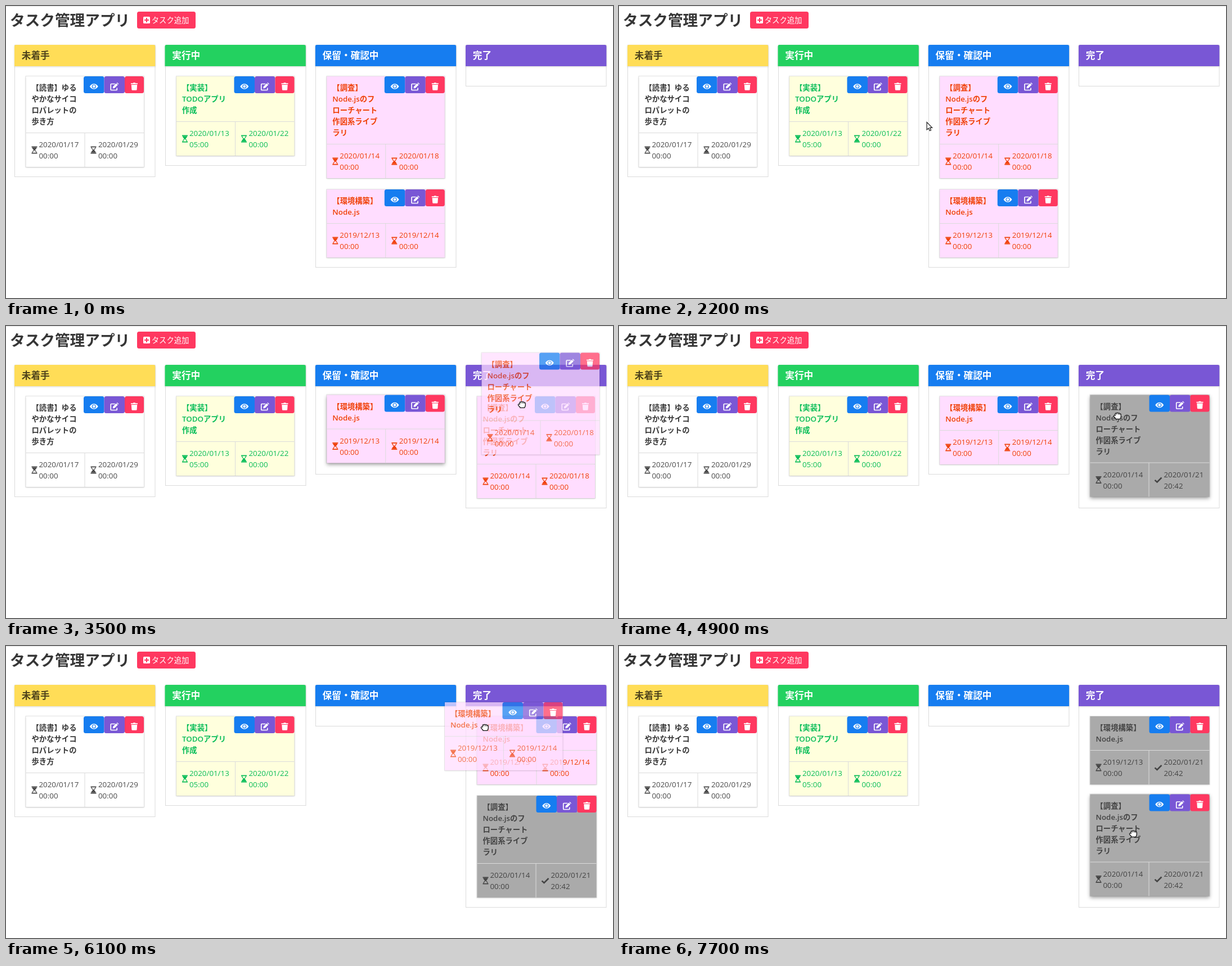
Write an HTML page that moves like this. It is 1079x519 px and loops after 8000 ms.

```html
<!DOCTYPE html>
<html lang="ja">
<head>
<meta charset="utf-8">
<title>タスク管理アプリ</title>
<style>
html, body { margin: 0; width: 100%; height: 100%; overflow: hidden; background: #fff; }
svg { display: block; width: 100%; height: 100%; }
text { font: 13.333px "Open Sans", "Noto Sans", "Noto Sans CJK JP", "Noto Sans CJK", sans-serif; white-space: pre; }
.title { font-weight: 600; }
.head { font-size: 16.667px; font-weight: 600; }
.app { font-size: 26.667px; font-weight: 600; }
.add { font-weight: 500; }
.shadow { filter: drop-shadow(0 1.5px 1.5px rgba(10,10,10,.16)); }
.lifted { filter: drop-shadow(0 3px 3px rgba(10,10,10,.38)); }
</style>
</head>
<body>
<svg id="stage" viewBox="0 0 1079 519"></svg>
<script>
const LOOP = 8000, STEP = 100, TOP = 125;
const stage = document.getElementById('stage');

const columns = [
  { x: 15, label: '未着手', fill: '#ffdd57', ink: 'rgba(0,0,0,.7)' },
  { x: 282.5, label: '実行中', fill: '#23d160', ink: '#fff' },
  { x: 549.8, label: '保留・確認中', fill: '#167df0', ink: '#fff' },
  { x: 817, label: '完了', fill: '#7957d5', ink: '#fff' }
];

const pink = { fill: '#ffddff', ink: '#f04006', titleInk: '#f04006' };
const gray = { fill: '#aaa', ink: '#444', titleInk: '#444', end: ['2020/01/21', '20:42'], done: true };
const reading = {
  lines: ['【読書】ゆる', 'やかなサイコ', 'ロパレットの', '歩き方'],
  start: ['2020/01/17', '00:00'], end: ['2020/01/29', '00:00'],
  fill: '#fff', ink: '#4a4a4a', titleInk: '#363636'
};
const coding = {
  lines: ['【実装】', 'TODOアプリ', '作成'],
  start: ['2020/01/13', '05:00'], end: ['2020/01/22', '00:00'],
  fill: '#ffffdd', ink: '#08bd58', titleInk: '#08bd58'
};
const survey = {
  lines: ['【調査】', 'Node.jsのフ', 'ローチャート', '作図系ライブ', 'ラリ'],
  start: ['2020/01/14', '00:00'], end: ['2020/01/18', '00:00'], ...pink
};
const setup = {
  lines: ['【環境構築】', 'Node.js'],
  start: ['2019/12/13', '00:00'], end: ['2019/12/14', '00:00'], ...pink
};
const surveyDone = { ...survey, ...gray }, setupDone = { ...setup, ...gray };

// Tracks hold [time, x, y]
const pointer = [
  [300, 128, 8], [500, 146, 110], [700, 158, 184], [800, 158, 184], [1300, 286.5, 188.5],
  [1600, 350, 192], [1800, 350, 192], [2400, 645, 213], [2800, 645, 213], [2900, 822, 189],
  [3500, 917, 140], [4800, 917, 140], [4900, 886, 160], [5200, 806, 120], [5700, 642, 167],
  [5800, 720, 160], [5900, 790, 153], [6000, 790, 153], [6100, 851, 145], [6300, 886, 135],
  [6800, 886, 135], [7700, 914, 334]
];
const drags = [
  { card: survey, from: 2900, to: 3900, track: [[2900, 746, 99], [3500, 845.5, 47.5]] },
  { card: setup, from: 5800, to: 6600,
    track: [[5800, 650, 114], [5900, 719, 109], [6000, 719, 109], [6100, 780, 100], [6300, 814, 90]] }
];

function at(track, t) {
  const i = track.findIndex(key => key[0] > t);
  if (i < 0) return track[track.length - 1].slice(1);
  if (i === 0) return track[0].slice(1);
  const a = track[i - 1], b = track[i], k = (t - a[0]) / (b[0] - a[0]);
  return [a[1] + (b[1] - a[1]) * k, a[2] + (b[2] - a[2]) * k];
}

function board(t) {
  const open = t < 3200 ? [survey, setup] : t < 6100 ? [setup] : [];
  const closed = t < 3200 ? [] : t < 4000 ? [survey] : t < 6100 ? [surveyDone]
    : [t < 6600 ? setup : setupDone, surveyDone];
  return [[reading], [coding], open, closed];
}

const rect = (x, y, w, h, fill, extra = '') =>
  `<rect x="${x}" y="${y}" width="${w}" height="${h}" fill="${fill}" ${extra}/>`;
const line = (x1, y1, x2, y2) => `<path d="M${x1} ${y1}L${x2} ${y2}" stroke="#dbdbdb"/>`;
const text = (x, y, str, fill, cls = '') =>
  `<text x="${x}" y="${y}" fill="${fill}" class="${cls}">${str}</text>`;
const place = (x, y, body, extra = '') => `<g transform="translate(${x} ${y}) ${extra}">${body}</g>`;

const icons = {
  eye: `<path d="M-7.5 0C-4-6.4 4-6.4 7.5 0C4 6.4-4 6.4-7.5 0z" fill="#fff"/>
    <circle r="3.6" fill="#167df0"/><circle r="2.4" fill="#fff"/>`,
  edit: `<path d="M1-4.5H-5.5Q-6.5-4.5-6.5-3.5V5.5Q-6.5 6.5-5.5 6.5H3.5Q4.5 6.5 4.5 5.5V2.5" fill="none" stroke="#fff" stroke-width="1.7"/>
    <path d="M-3 3.5L-2.6.3L3.2-5.5L6-2.7L.2 3.1zM4-6.3L5-7.1L7.6-4.5L6.8-3.5z" fill="#fff"/>`,
  trash: `<path d="M-6-5.7H-2.3L-1.6-6.7H1.6L2.3-5.7H6V-4H-6zM-5.2-3.1H5.2L4.6 5.5Q4.5 6.7 3.3 6.7H-3.3Q-4.5 6.7-4.6 5.5z" fill="#fff"/>`,
  plus: `<rect x="-6" y="-6" width="12" height="12" rx="1.5" fill="#fff"/>
    <path d="M-4 0H4M0-4V4" stroke="#ff3860" stroke-width="2"/>`,
  arrow: `<path d="M.5.5V14L3.6 11.2L5.7 15.8L8 14.8L5.9 10.3H10z" fill="#fff" stroke="#222" stroke-width="1.2"/>`,
  hand: `<path d="M-4-1V-3.5Q-3.6-5.5-1.6-4.8Q0-6.4 1.5-4.8Q3.2-5.7 4-4Q6.3-4.4 6.3-2V1Q6.3 3 4.6 5.3H-3Q-3.4 3.7-5.2 2.3Q-7.3 0-6.2-1Q-5.2-1.8-4-1z" fill="#fff" stroke="#111" stroke-width="1.3"/>
    <path d="M-1.4-3.8V-2.3M1.5-3.8V-2.3M4-3.2V-2" stroke="#111"/>`
};
const hourglass = ink => `<path d="M-5-6.6H5V-4.8H-5zM-5 4.8H5V6.6H-5zM-4.2-5C-4.2-2-1.4-1.2-1.4 0H1.4C1.4-1.2 4.2-2 4.2-5z" fill="${ink}"/>
  <path d="M-3.6 5C-3.6 2-.9 1.2-.9 0H.9C.9 1.2 3.6 2 3.6 5" fill="none" stroke="${ink}" stroke-width="1.3"/>`;
const check = ink => `<path d="M-6 .3L-2 4L6-4" fill="none" stroke="${ink}" stroke-width="2.5"/>`;

const cardHeight = card => card.lines.length * 20 + 81;

function drawCard(card, w, lifted) {
  const h = cardHeight(card), foot = h - 60.5, mid = foot + 30.5;
  const split = card.done ? 104.5 : Math.round(w / 2) - .5;
  const dates = (x, rows) => rows.map((s, i) => text(x, foot + 25.5 + i * 20, s, card.ink)).join('');
  const button = (x, bw, fill, icon) =>
    rect(x, 0, bw, 30, fill, 'rx="3.5"') + place(x + bw / 2, 18, icons[icon]);
  return rect(0, 0, w, h, card.fill, `class="${lifted ? 'lifted' : 'shadow'}"`) +
    rect(-.5, -.5, w + 1, h + 1, 'none', 'stroke="rgba(10,10,10,.1)"') +
    card.lines.map((s, i) => text(10, 25 + i * 20, s, card.titleInk, 'title')).join('') +
    line(0, foot, w, foot) + line(split, foot, split, h) +
    place(15, mid, hourglass(card.ink)) + dates(23, card.start) +
    (card.done
      ? place(split + 16.5, mid, check(card.ink)) + dates(split + 26.5, card.end)
      : place(split + 15.5, mid, hourglass(card.ink), 'rotate(180)') + dates(split + 24, card.end)) +
    button(w - 107, 36.5, '#167df0', 'eye') +
    button(w - 70.5, 36.5, '#7957d5', 'edit') +
    button(w - 34, 34, '#ff3860', 'trash');
}

function drawColumn(col, cards, isLifted) {
  const x = col.x + 20.5, w = cards.some(c => c.done) ? 212 : 209.5;
  let y = TOP, body = '';
  for (const card of cards) {
    const lifted = isLifted(x, y, w, cardHeight(card));
    body += place(x, lifted ? y - 2.5 : y, drawCard(card, w, lifted));
    y += cardHeight(card) + 20;
  }
  const bottom = cards.length ? y - 3 : 142, left = Math.round(col.x) + .5;
  return rect(left, 69.5, 249.5, bottom - 69, '#fff', 'stroke="#dbdbdb"') +
    `<path d="M${col.x} 107V72q0-3 3-3h244.3q3 0 3 3v35z" fill="${col.fill}" class="shadow"/>` +
    text(col.x + 12.8, 94, col.label, col.ink, 'head') + body;
}

function draw(t) {
  const [px, py] = at(pointer, t);
  const drag = drags.find(d => t >= d.from && t < d.to);
  let overCard = false;
  const isLifted = (x, y, w, h) => {
    // A running drag keeps the hover on the slot it was taken from
    if (drag) return y === TOP && x > 560 && x < 600;
    const hit = t >= 300 && px >= x && px <= x + w && py >= y && py <= y + h;
    overCard = overCard || hit;
    return hit;
  };

  let out = rect(0, 0, 1079, 1, '#e4e4e4') +
    text(7, 35, 'タスク管理アプリ', '#363636', 'app') +
    rect(233, 10, 104, 30, '#ff3860', 'rx="3.5"') +
    place(250, 25, icons.plus) + text(258.8, 30, 'タスク追加', '#fff', 'add');

  board(t).forEach((cards, i) => { out += drawColumn(columns[i], cards, isLifted); });

  if (drag) {
    const [x, y] = at(drag.track, t), fresh = t === drag.from;
    out += `<g opacity="${fresh ? .54 : .72}">` +
      place(x, y, drawCard(drag.card, 209.5, false), fresh ? 'scale(.983)' : '') + '</g>';
  }
  if (t >= 300) out += place(px, py, drag || overCard ? icons.hand : icons.arrow);
  stage.innerHTML = out;
}

let shown = -1;
const origin = performance.now();
function frame() {
  const t = Math.floor(((performance.now() - origin) % LOOP) / STEP) * STEP;
  if (t !== shown) draw(shown = t);
  requestAnimationFrame(frame);
}
frame();
</script>
</body>
</html>
```
